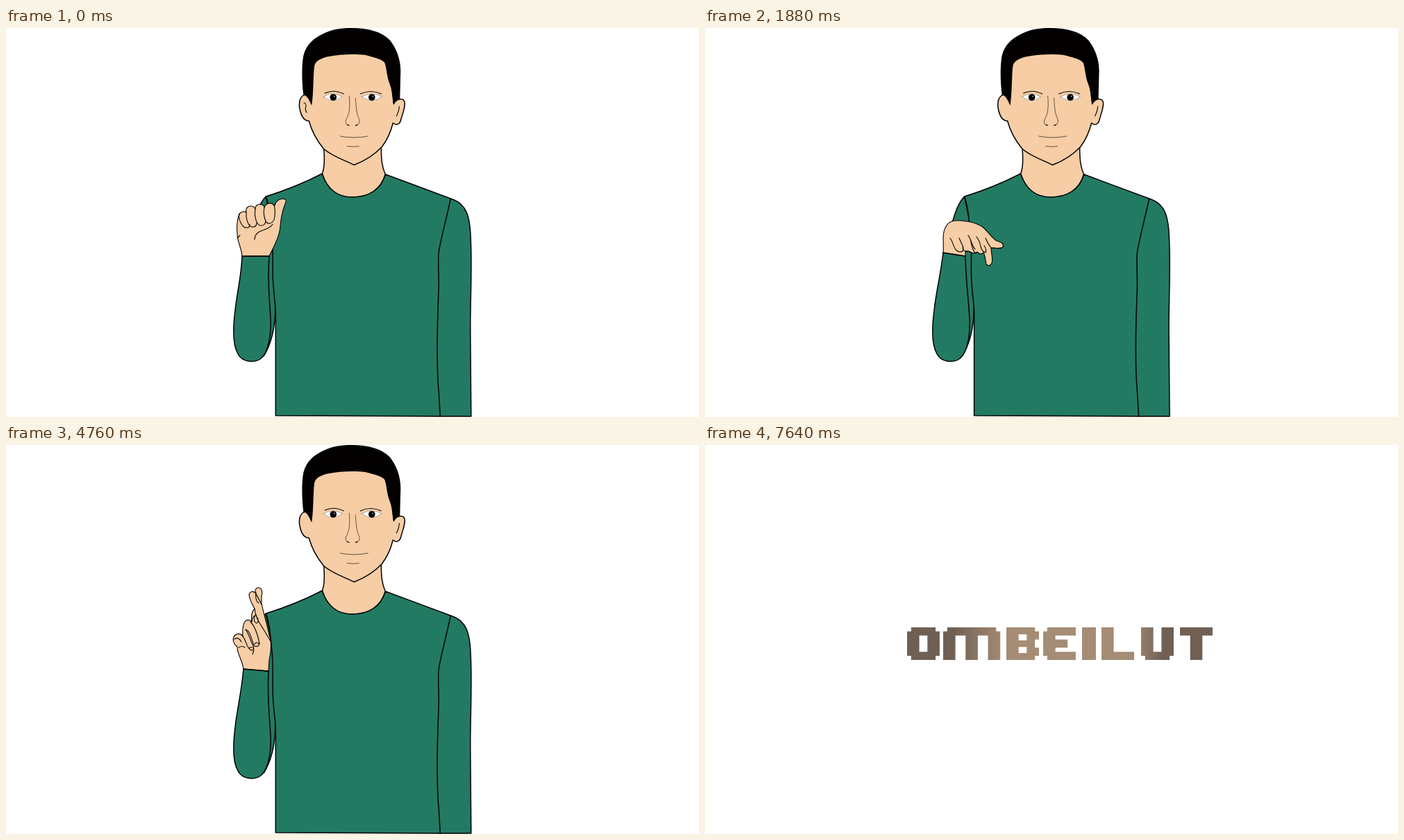
Write an HTML page that moves like this. It is 998 px wide and 561 px high and loops after 8640 ms.

```html
<!DOCTYPE html>
<html lang="en">
<head>
<meta charset="utf-8">
<title>Fingerspelling</title>
<style>
  html, body { margin: 0; width: 100%; height: 100%; overflow: hidden; background: #fff; }
  svg { display: block; width: 100%; height: 100%; }
  .scene { opacity: 0; }
  .ink { stroke: #000; stroke-width: 1.5; stroke-linejoin: round; stroke-linecap: round; fill: none; }
  .fine { stroke-width: 1.1; }
  .thin { stroke-width: .6; }
  .skin { fill: #f6cda5; }
  .shirt { fill: #237a63; }
</style>
</head>
<body>
<svg id="stage" viewBox="0 0 998 561">
  <defs>
    <linearGradient id="bronze" gradientUnits="userSpaceOnUse" x1="291" x2="731" y1="278" y2="296">
      <stop offset=".15" stop-color="#706053"/>
      <stop offset=".32" stop-color="#a58c75"/>
      <stop offset=".73" stop-color="#a58c75"/>
      <stop offset=".84" stop-color="#706053"/>
    </linearGradient>
    <g id="body" class="ink">
      <path class="skin" d="M457 170C459 190 458 203 455 210C462 232 477 244 498 244C522 244 540 233 546 211C541 200 540 190 540 170"/>
      <path class="skin" d="M439 108C438 98 433 95 428 97C422 101 421 110 423 118C425 127 429 134 436 134C440 149 448 163 457 174C469 185 486 190 501 197.500C518 191 531 182 541 171.500C549 161 554 149 557 137C562 141 566 139 568 134C570 125 574 118 574 108C573 101 564 100 558 109L550 30H441Z"/>
      <path class="fine" d="M566 113C566 119 564 123 562 127"/>
      <path fill="#020100" stroke="none" d="M440 112C436 103 433 97 428 96C426 80 425 56 428 40C432 23 444 14 457 8C469 2 482 0 497 0C521 0 541 5 553 18C561 29 568 43 568 62L567 102C563 103 560 106 558 111C556 100 556 90 552 80C548 70 548 58 545 50C540 44 528 42 517 39C501 37 480 38 465 41C454 43 446 47 444 54C442 65 443 91 440 112Z"/>
      <path fill="#fff" class="thin" stroke="#777" d="M457 99Q470 91 484 99Q470 110 457 99ZM512 99Q527 91 541 99Q527 110 512 99Z"/>
      <path class="fine" d="M459 94Q472 88 486 95M510 95Q525 88 540 95"/>
      <g fill="#000" stroke="none"><circle cx="471" cy="100" r="4.800"/><circle cx="526.500" cy="100" r="4.800"/></g>
      <g fill="#fff" stroke="none"><circle cx="472.500" cy="98.500" r=".8"/><circle cx="528" cy="98.500" r=".8"/></g>
      <path class="thin" d="M494 98C496 118 493 126 489 133Q488 139 492 140M503 101C504 121 506 127 509 133Q509 139 504 141M481 156Q500 160 521 156M491 170.500Q500 172 508 170.500"/>
      <path class="fine" d="M491 139.500l3 1M503 140.500l3-1"/>
      <path class="shirt" d="M374 243C367 250 361 264 357 279L352 330V440L371 473C382 455 387 432 387.500 408L386 300Z"/>
      <path class="shirt" d="M455 210C430 223 403 234 374 243C381 264 380 274 382 290C386 323 382 349 385 375C386 391 388 398 388 412V559L625 560H669.500L668.500 440C668 402 671 350 669 305C668 269 662 253 640 246L546 211C540 233 522 244 498 244C477 244 462 232 455 210Z"/>
      <path d="M640 246C635 271 628 295 623 322C621 341 624 357 622.500 385C621 423 619 482 623 526L625 560"/>
    </g>
  </defs>
</svg>
<script>
const LOOP = 8640;
const stage = document.getElementById('stage');

// Each hand: cuff ends, outline, creases.
const hands = {
  A: {
    cuff: [340, 329, 379, 329],
    shape: 'M340 329C339 316 333 309 333 296C332 285 333 276 336 268C339 265 343 264 346 266C344 259 350 256 354 257C357 257 358 259 359 261C359 255 364 253 369 255Q372 256 372 259C374 252 382 251 385 255L387 256C389 249 394 246 400 246.500Q404 247 403 251C398 263 396 272 395 286C394 300 388 310 385 317L379 329Z',
    lines: 'M336 268C334 275 340 289 347 288Q351 288 351 283M346 266C345 275 349 287 355 287Q361 287 361 281M359 261C357 272 361 285 367 285Q373 285 374 279M372 259C370 269 373 282 379 282Q386 281 387 272Q388 262 386 255M384 283C379 291 370 290 363 295Q358 299 358 305M333 303L337 299'
  },
  M: {
    cuff: [341, 323, 378, 326],
    shape: 'M341 322C338 308 330 299 331 284C331 272 331 265 336 262L343 259C341 254 343 249 346 247C344 242 346 240 348 240C347 234 352 231 357 233L362 236C363 231 370 230 373 233L378 239C383 236 388 239 389 244C389 255 392 265 392 275Q389 279 385 277C387 294 381 305 378 326Z',
    lines: 'M348 240C356 240 357 248 358 259Q360 270 366 268Q370 266 367 259C366 249 365 243 362 236M362 236C368 244 367 258 371 268Q374 274 379 270C382 262 381 247 378 239M378 239C381 250 380 263 383 275L385 277M346 247Q351 246 355 253M343 259Q350 257 354 261Q358 267 357 274M343 259C347 266 345 283 352 287Q357 287 355 280M344 253L353 254M334 266Q341 267 342 274Q340 278 334 278M363 269L356 286M357 280Q360 291 358 299M342 320Q346 318 352 319'
  },
  P: {
    cuff: [343, 324, 375, 329],
    shape: 'M343 324C344 313 342 303 344 294C346 286 351 279 359 278C373 277 389 280 400 287C408 294 412 302 420 307C428 309 431 312 429 316C425 319 418 317 412 317C412 325 415 333 413 339Q410 345 405 341C404 333 403 327 401 324Q397 328 392 323Q389 326 384 324C380 321 378 322 375 322V329Z',
    lines: 'M353 303C358 309 358 322 367 323Q374 323 371 314L366 303M371 317Q373 324 379 322M379 299C385 308 384 314 389 319M382 304Q386 325 390 324M391 301Q396 308 397 315Q399 323 404 324Q406 319 402 314M404 303Q407 311 412 317M412 317L426 318'
  },
  I: {
    cuff: [341, 323, 378, 326],
    shape: 'M341 323C339 309 332 300 333 286C334 268 333 252 335 234Q336 222 341 222Q346 223 345 234L347 260C349 255 355 254 359 258C362 253 369 253 372 258C376 254 383 256 385 262C389 272 389 283 386 295C385 307 380 315 378 326Z',
    lines: 'M347 260C348 271 348 282 354 286Q360 287 360 279L359 258M360 279Q363 287 369 284Q374 281 372 258M373 277Q376 286 382 281Q386 276 385 262M386 294C378 290 369 292 359 288Q354 291 358 296C364 300 370 299 375 303M337 226Q341 224 343 228'
  },
  R: {
    cuff: [342, 323, 378, 326],
    shape: 'M342 323C340 309 333 302 333 291C328 288 326 281 328 277C331 271 338 271 341 276C340 265 342 255 346 253Q350 251 354 255C353 248 354 240 358 236C354 229 350 220 350 215Q353 209 359 213C358 207 362 204 367 207Q370 212 368 217V228C371 244 376 258 379 274C383 284 382 296 379 310L378 326Z',
    lines: 'M359 213C363 220 366 225 368 230M358 236C359 249 366 258 371 266L381 283M354 255Q355 245 361 246M360 212C359 220 361 226 364 228M358 246Q356 256 361 257Q365 255 362 249M341 276C346 281 346 293 353 296Q358 297 356 290C352 282 350 273 345 266M345 266C353 269 353 282 358 290Q364 292 365 286C363 276 360 263 352 255M329 280Q335 276 339 284M335 292Q340 289 344 292M350 293Q354 290 357 294M358 287Q361 283 365 287M357 296L355 302'
  },
  E: {
    cuff: [341, 323, 378, 326],
    shape: 'M341 323C339 308 332 301 332 286C331 273 332 261 337 257Q342 254 346 258C347 249 356 247 360 253C363 247 371 247 374 253C379 248 387 253 388 261C390 271 388 281 387 291C386 307 380 314 378 326Z',
    lines: 'M346 258C347 267 349 279 346 283Q340 287 336 279M360 253C361 267 361 277 357 281Q351 284 347 278M374 253C374 266 374 275 371 280Q364 283 360 275M388 266C387 276 384 281 378 280L373 275M387 291C377 284 363 285 352 286Q346 289 351 293C361 294 369 295 374 303'
  },
  D: {
    cuff: [344, 323, 375, 328],
    shape: 'M344 323C345 307 345 294 347 282L351 264C352 251 349 236 349 226Q349 219 354 221Q357 224 357 231C360 242 361 251 363 261C369 254 380 256 388 259Q396 264 397 274Q403 279 402 284C400 292 395 295 392 301C389 314 380 320 375 328Z',
    lines: 'M357 281C360 272 366 267 376 267Q386 267 392 275M397 274Q391 275 393 281Q395 289 390 290Q386 290 385 284M392 276C387 282 379 283 380 290L377 301M397 274Q394 278 395 282M351 226Q353 221 356 226'
  }
};

// Start time, hand, sideways offset of the body.
const poses = [
  [0, 'A', .3], [920, 'M', -.4], [1880, 'P', -.4], [2840, 'A', .3],
  [3800, 'I', -.4], [4760, 'R', .3], [5720, 'E', -.4], [6680, 'D', -.4]
];
const TITLE_START = 7640;

const glyphs = {
  O: 'M1 0h6v1h1v6h-1v1h-6v-1h-1v-6h1zM3 2v4h2v-4z',
  M: 'M1 0h12v1h1v7h-3v-6h-2.5v6h-3v-6h-2.5v6h-3v-7h1z',
  B: 'M0 0h7v1h1v2h-1v2h1v2h-1v1h-7zM3 1.700v1.500h2v-1.500zM3 4.800v1.500h2v-1.500z',
  E: 'M1 0h7v2h-5v1h3v2h-3v1h5v2h-7v-1h-1v-6h1z',
  I: 'M0 0h3.400v8h-3.400z',
  L: 'M0 0h3v6h5v2h-8z',
  U: 'M0 0h3v6h2v-6h3v7h-1v1h-6v-1h-1z',
  T: 'M0 0h8v2h-2.500v6h-3v-6h-2.500z'
};
const word = 'OMBEILUT';
const letterX = [291, 343, 434, 487, 543, 571, 628, 684];
const CELL = 5.87;

function figure(name, shift) {
  const { cuff: [x1, y1, x2, y2], shape, lines } = hands[name];
  const ear = name === 'A' ? '<path class="ink fine" d="M429 108Q432 108 432 113Q430 117 433 122"/>' : '';
  return `<use href="#body" x="${shift}"/>${ear}
    <g class="ink">
      <path class="shirt" d="M${x1} ${y1}C339 358 333 379 330 407C327 430 326 456 334 470C340 482 358 484 368 476C378 466 382 444 381 420C380 394 376 371 ${x2} ${y2}Z"/>
      <path class="skin fine" d="${shape}"/>
      <path class="fine" d="${lines}"/>
      <path d="M${x1} ${y1}L${x2} ${y2}"/>
    </g>`;
}

// One gradient runs across the whole word, so the glyphs act as a clip.
function title() {
  const paths = [...word].map((c, i) =>
    `<path clip-rule="evenodd" d="${glyphs[c]}" transform="translate(${letterX[i]} 263) scale(${CELL})"/>`).join('');
  return `<clipPath id="word">${paths}</clipPath>
    <rect role="img" aria-label="${word}" x="290" y="262" width="443" height="50" fill="url(#bronze)" clip-path="url(#word)"/>`;
}

function addScene(markup, start, end) {
  const g = document.createElementNS(stage.namespaceURI, 'g');
  g.setAttribute('class', 'scene');
  g.innerHTML = markup;
  stage.append(g);
  const steps = [[0, start === 0], [start, true], [end, false], [LOOP, end === LOOP]];
  g.animate(
    steps.map(([t, on]) => ({ offset: t / LOOP, opacity: on ? 1 : 0, easing: 'step-end' })),
    { duration: LOOP, iterations: Infinity }
  ).startTime = 0;
}

poses.forEach(([start, name, shift], i) =>
  addScene(figure(name, shift), start, poses[i + 1]?.[0] ?? TITLE_START));
addScene(title(), TITLE_START, LOOP);
</script>
</body>
</html>
```
